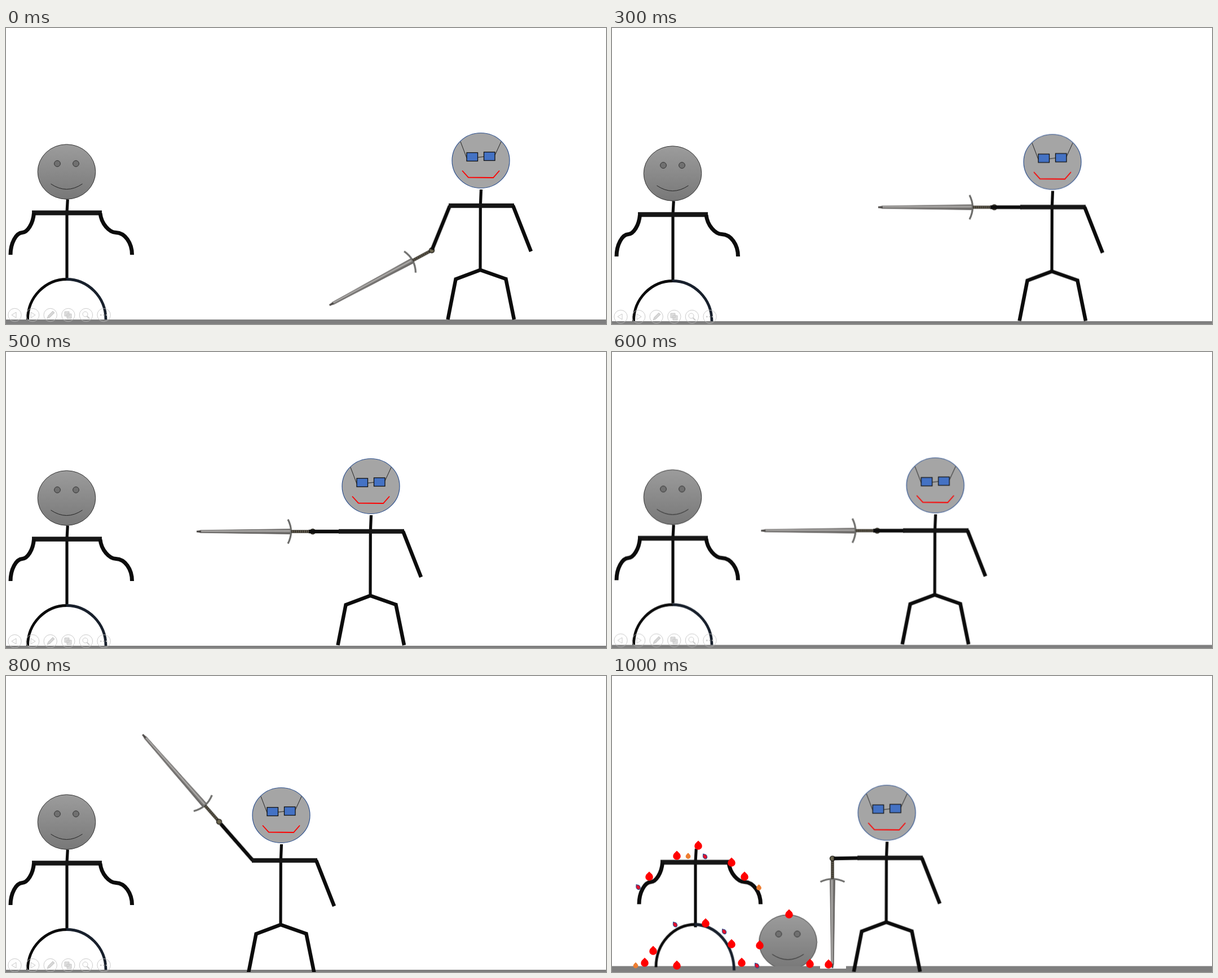
Animation of 1064x526 px, one loop 2500 ms. Source, as an HTML page:

```html
<!DOCTYPE html>
<html lang="en">
<head>
<meta charset="utf-8">
<title>Stick figure duel</title>
<style>
  html, body { margin: 0; width: 100%; height: 100%; overflow: hidden; background: #fff; }
  svg { display: block; width: 100%; height: 100%; }
  .line { fill: none; stroke: #0c0c0c; stroke-width: 6.5; }
  .thin { fill: none; stroke: #222; stroke-width: 1; }

  /* Every part holds its pose for 100 ms (4 % of the loop). */
  .drift, .hero, .torso, .arm, .sword, .head, .body, .leg, .tools, .after {
    animation: 2500ms step-end infinite;
  }
  .drift { animation-name: drift; }
  .hero { animation-name: hero; }
  .torso { animation-name: torso; }
  .arm { animation-name: arm; }
  .sword { animation-name: sword; }
  .head { animation-name: head; }
  .body { animation-name: body; }
  .leg { animation-name: leg; transform-origin: 107.5px 446px; }
  .tools { animation-name: tools; }
  .after { animation-name: after; }

  @keyframes drift {
    0% { transform: translateY(0); }
    4% { transform: translateY(.5px); }
    8% { transform: translateY(1px); }
    12% { transform: translateY(3px); }
    16% { transform: translateY(5px); }
    20% { transform: translateY(4px); }
    24% { transform: translateY(2.5px); }
    28% { transform: translateY(4px); }
    40%, 100% { transform: translateY(-2.5px); }
  }
  @keyframes hero {
    0% { transform: translate(0, 0); }
    4% { transform: translate(0, .5px); }
    8% { transform: translate(0, 1px); }
    12% { transform: translate(-61px, 2.5px); }
    16% { transform: translate(-122px, 4px); }
    20% { transform: translate(-195px, 3px); }
    24% { transform: translate(-268.7px, 1.5px); }
    28% { transform: translate(-354px, 12px); }
    40%, 100% { transform: translate(-354.7px, 7.5px); }
  }
  @keyframes torso {
    0% { transform: translateX(0); }
    32%, 100% { transform: translateX(5px); }
  }
  @keyframes arm {
    0% { transform: rotate(-68deg) scaleX(.84); }
    4% { transform: rotate(-34deg) scaleX(.65); }
    8% { transform: rotate(0deg) scaleX(.55); }
    32% { transform: rotate(48.8deg) scaleX(.87); }
    36% { transform: rotate(22.6deg) scaleX(.87); }
    40%, 100% { transform: rotate(-1deg) scaleX(.44); }
  }
  @keyframes sword {
    0% { transform: translate(755px, 395px) rotate(-28.3deg); }
    4% { transform: translate(733px, 352px) rotate(-14deg); }
    8% { transform: translate(735px, 316px) rotate(0deg); }
    12% { transform: translate(739px, 316px) rotate(0deg); }
    32% { transform: translate(727px, 247px) rotate(48.8deg); }
    36% { transform: translate(703px, 281px) rotate(24.4deg); }
    40%, 100% { transform: translate(740.7px, 316.7px) rotate(-90deg) scaleX(.945); }
  }
  @keyframes head {
    0% { transform: translate(0, 0); }
    40%, 100% { transform: translate(204.5px, 220px); }
  }
  @keyframes body {
    0% { transform: translate(0, 0); }
    40%, 100% { transform: translate(40px, 5px); }
  }
  @keyframes leg {
    0% { transform: translate(0, 0); }
    40%, 100% { transform: translate(39.5px, -2.5px) scaleY(var(--stretch)); }
  }
  @keyframes tools {
    0% { opacity: 1; }
    28% { opacity: 0; }
    32% { opacity: 1; }
    40%, 100% { opacity: 0; }
  }
  @keyframes after {
    0% { opacity: 0; }
    40%, 100% { opacity: 1; }
  }
</style>
</head>
<body>
<svg viewBox="0 0 1064 526" preserveAspectRatio="none">
  <defs>
    <linearGradient id="skin" x1="0" y1="0" x2="0" y2="1">
      <stop offset="0" stop-color="#9c9c9c"/>
      <stop offset="1" stop-color="#787878"/>
    </linearGradient>
    <linearGradient id="steel" x1="0" y1="0" x2="0" y2="1">
      <stop offset="0" stop-color="#686664"/>
      <stop offset=".45" stop-color="#b4b2b0"/>
      <stop offset=".55" stop-color="#858381"/>
      <stop offset="1" stop-color="#5a5856"/>
    </linearGradient>
    <path id="drop" d="M1 0A1 1 0 1 1 0-1Q.5-1 1-1Q1-.5 1 0Z"/>
  </defs>

  <!-- unarmed figure and floor -->
  <g class="drift">
    <g class="head">
      <ellipse cx="107.5" cy="255.5" rx="51.3" ry="48.7" fill="url(#skin)" stroke="#333"/>
      <g fill="#707070" stroke="#333">
        <circle cx="91" cy="241" r="5.4"/>
        <circle cx="124" cy="241" r="5.4"/>
      </g>
      <path class="thin" d="M79.5 277Q107.5 296 135.500 277"/>
    </g>
    <rect y="518" width="1064" height="40" fill="#7f7f7f"/>
    <g class="body line">
      <path d="M109.300 304.500L108 328V444" stroke-width="5.200"/>
      <path d="M46 328.500H170" stroke="#161616" stroke-width="8.500"/>
      <path d="M49.500 329C48 348 38 363 29 363.500C18 364 8 382 8 403" stroke-width="7"/>
      <path d="M167 329C169 348 183 363 195 363.500C211 364 223.500 382 223.500 403" stroke-width="7"/>
    </g>
    <path class="leg line" style="--stretch:1.06;stroke-width:4.800" d="M108 446.500A69.500 71.500 0 0 0 38.500 518"/>
    <path class="leg line" style="--stretch:1.14;stroke-width:4.800;stroke:#18202c" d="M107 446.500A70 71.500 0 0 1 177 518"/>
  </g>

  <rect class="after" x="369" y="514" width="46" height="6" fill="#fff"/>

  <!-- swordsman -->
  <g class="hero">
    <ellipse cx="842" cy="235.500" rx="51" ry="49" fill="#a5a5a5" stroke="#2f528f" stroke-width="1.200"/>
    <path class="thin" d="M817 231L806 202M836 230L848 228.500M867 226L878 202"/>
    <g fill="#4472c4" stroke="#111" stroke-width="1.300">
      <rect x="817" y="221.500" width="19.500" height="15"/>
      <rect x="847.500" y="220.500" width="19.500" height="15"/>
    </g>
    <path d="M809 253.500L820 265.500L864 266L875 253.500" fill="none" stroke="#f00" stroke-width="1.800"/>
    <g class="line">
      <path d="M842.500 287L841.300 316L841 431" stroke-width="5.200"/>
      <path d="M797 446.500L841 430L888 446.500" stroke-width="6.500"/>
      <path d="M798 444L783.500 518M886 444L901 518"/>
    </g>
    <g class="torso">
      <g class="sword">
        <path d="M-38-4.500L-199-2.200L-206 0L-199 2.200L-38 4.500Z" fill="url(#steel)" stroke="#5c5a58" stroke-width=".8"/>
        <path d="M-198 0L-206 0" stroke="#4a4745" stroke-width="3"/>
        <path d="M-44-21.500Q-33 0-44 21.500" fill="none" stroke="#6d6d6b" stroke-width="3.200"/>
        <path d="M-38 0H-4" stroke="#3b372e" stroke-width="5.500"/>
        <path d="M-36 0H-4" stroke="#777061" stroke-width="4" stroke-dasharray="1 2.500"/>
        <circle r="4.400" fill="#6d6750" stroke="#25231d" stroke-width="1.500"/>
      </g>
      <g transform="translate(787 316)">
        <path class="arm line" d="M0 0H-100"/>
      </g>
      <path class="line" d="M785 315.700H901" style="stroke:#161616;stroke-width:8"/>
      <path class="line" d="M899 315.500L931 397"/>
    </g>
  </g>

  <g class="after" id="blood"></g>

  <!-- slide show buttons -->
  <g class="drift">
    <g class="tools" fill="none" stroke="#bdbdbd" stroke-opacity=".8">
      <g id="rings"></g>
      <path d="M18 505V515L10 510ZM44 505V515L52 510Z"/>
      <path d="M73 516L75 511L83 503L86 506L78 514Z" fill="#d6d6d6"/>
      <path d="M104 504H112V512H104ZM108 508H116V516H108Z" fill="#dedede"/>
      <path d="M143.500 512L148 516.500" stroke-width="2"/>
      <circle cx="140.500" cy="508.500" r="4.500"/>
      <path d="M167 510H180" stroke-width="2.500" stroke-dasharray="2.500 2.500"/>
    </g>
  </g>
</svg>
<script>
  const make = (parent, tag, attrs) => {
    const el = document.createElementNS("http://www.w3.org/2000/svg", tag);
    for (const key in attrs) el.setAttribute(key, attrs[key]);
    document.getElementById(parent).append(el);
  };

  for (let i = 0; i < 6; i++) make("rings", "circle", { cx: 15.5 + i * 31.6, cy: 510, r: 11.7 });

  const spill = (places, shape, look) => {
    for (const [x, y] of places) {
      make("blood", "use", { href: "#drop", transform: `translate(${x} ${y}) ${shape}`, ...look });
    }
  };
  spill([[115, 320], [153, 302], [212, 332], [235, 357], [66, 357], [166, 440], [73, 489], [58, 510],
         [115, 515], [212, 477], [230, 510], [262, 479], [314, 424], [351, 512], [384, 513]],
        "rotate(-45) scale(6.8)", { fill: "#f00" });
  spill([[135, 320.5], [260.5, 376.5], [42, 515]], "rotate(-45) scale(4.4)", { fill: "#ed7d31" });
  spill([[165, 321], [46.5, 375.5], [112, 442], [199, 454.5], [257, 515]],
        "rotate(-35) scale(3.4 4.2) rotate(-45)",
        { fill: "#e3102c", stroke: "#2f528f", "stroke-width": 0.3 });
</script>
</body>
</html>
```
